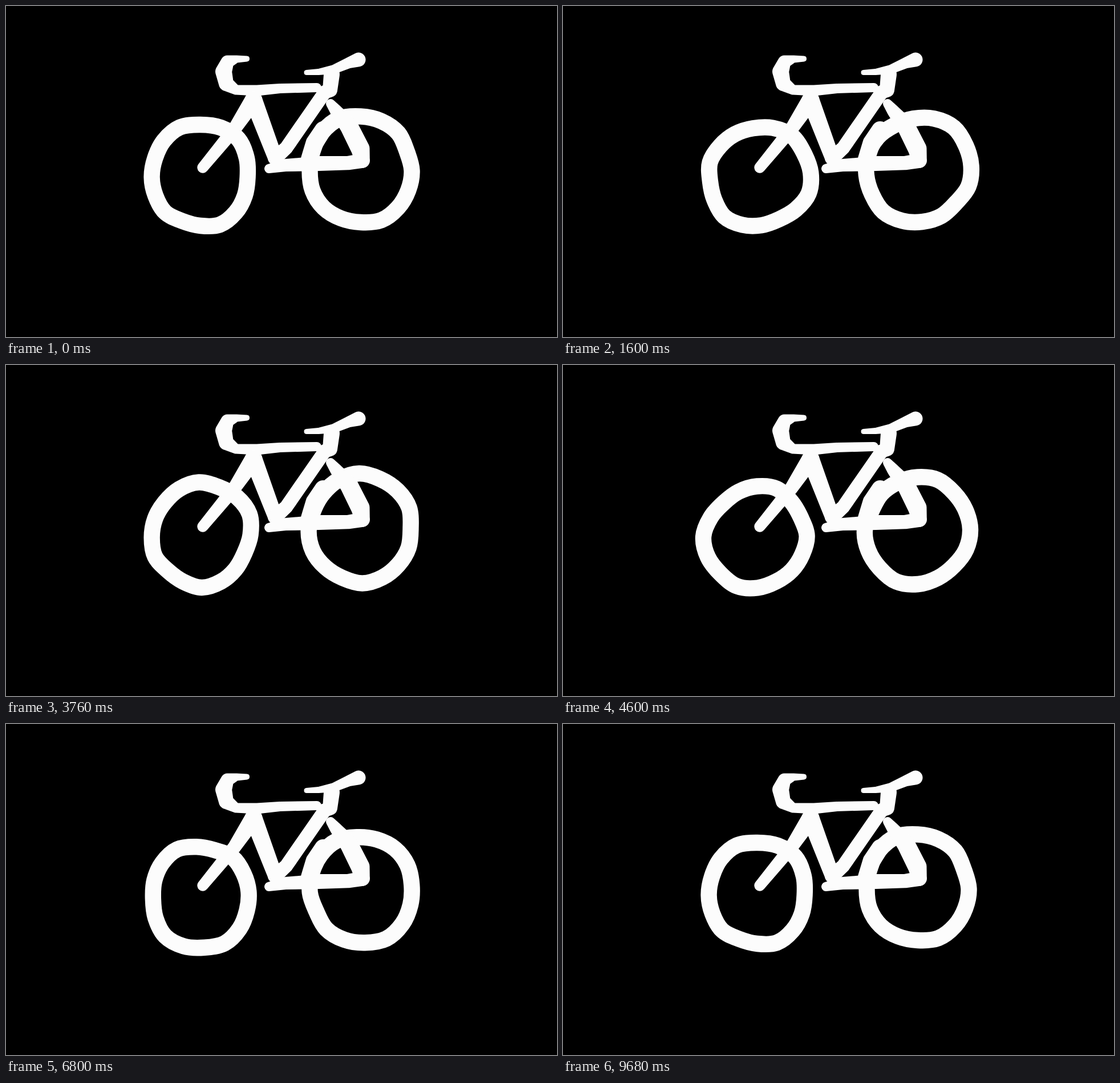
Write an HTML page that moves like this. It is 966 by 580 pixels and loops after 9720 ms.

```html
<!DOCTYPE html>
<html lang="en">
<head>
<meta charset="utf-8">
<title>Bicycle</title>
<style>
  html, body { margin: 0; width: 100%; height: 100%; overflow: hidden; background: #000; }
  svg { display: block; width: 100%; height: 100%; }
  path { fill: #fcfcfc; }
  .wheel { fill: none; stroke: #fcfcfc; stroke-width: 28.4; stroke-linejoin: round; }
</style>
</head>
<body>
<svg viewBox="0 0 966 580"></svg>
<script>
const STEP = 40, LAST = 242, TURNS = 5;
const svg = document.querySelector('svg');

function addPath(d, cls = '') {
  const el = document.createElementNS(svg.namespaceURI, 'path');
  el.setAttribute('d', d);
  el.setAttribute('class', cls);
  return svg.appendChild(el);
}

const polar = (x, y, r, a) => [x + r * Math.cos(a), y + r * Math.sin(a)];

// Wobbly rim: radii at even angles, joined by a smooth closed curve.
function rim(x, y, radii) {
  const n = radii.length;
  const at = i => polar(x, y, radii[(i + n) % n], i * 2 * Math.PI / n);
  const lean = (i, k) => at(i).map((v, j) => v + k * (at(i + 1)[j] - at(i - 1)[j]) / 6);
  return `M${at(0)}` + radii.map((_, i) =>
    `C${lean(i, 1)} ${lean(i + 1, -1)} ${at(i + 1)}`).join('') + 'Z';
}

// Tapered capsule around two circles.
function capsule([x1, y1, r1], [x2, y2, r2]) {
  const a = Math.atan2(y2 - y1, x2 - x1);
  const b = Math.acos((r1 - r2) / Math.hypot(x2 - x1, y2 - y1));
  const arc = (r, big, end) => `A${r} ${r} 0 ${+big} 1 ${end}`;
  return `M${polar(x1, y1, r1, a + b)}`
    + arc(r1, b < Math.PI / 2, polar(x1, y1, r1, a - b))
    + `L${polar(x2, y2, r2, a - b)}`
    + arc(r2, b > Math.PI / 2, polar(x2, y2, r2, a + b)) + 'Z';
}

const limb = (...joints) =>
  addPath(joints.slice(1).map((j, i) => capsule(joints[i], j)).join(''));

const wheels = [
  [340.6, 300, [83, 84.5, 87.5, 90, 85, 83, 87, 85, 85, 86, 90.5, 94.5, 92, 94, 94.5, 88]],
  [622, 288.5, [89.5, 90, 92, 94, 90.5, 90.5, 92, 91.5, 89.5, 91.5, 95.5, 98.5, 95, 94, 93, 87.5]]
].map(([x, y, radii]) => ({ x, y, el: addPath(rim(x, y, radii), 'wheel') }));

// Joints are x, y, radius.
const head = [434, 165, 15.5], crank = [472, 266, 13], seat = [559, 151, 12];

limb([422, 92.5, 5], [404, 93, 6.5], [388, 98, 11.5], [381.5, 115, 14.5],
  [386, 136, 13], [403, 147, 8.5], [440, 148, 9.5], [480, 144.5, 8.5], [545, 143, 8]); // bar, top tube
limb(head, [401, 215, 11.8], [345, 283, 9.7]);                                 // fork
limb(head, crank);                                                            // down tube
limb(seat, [491, 249, 12], crank);                                             // seat tube
limb([461, 285, 8], [490, 279, 11], [548, 276, 13], [600, 275, 12.3], [625, 271, 12.8]); // chainstay
limb([569, 171, 8], [579, 184, 11], [602, 212, 16], [621, 250, 16.5], [625, 271, 12.8]); // seat stay
limb([556, 217, 15], [541, 240, 15.5], [532, 268, 15]);                        // mudguard
limb(seat, [568, 147, 13], [571, 120, 14]);                                    // seat post
limb([527, 116.5, 4.5], [548, 115.5, 5.5], [575, 111, 8], [600, 100, 9.5], [618, 94, 12.5]); // saddle

function draw(ms) {
  const tick = Math.floor(ms / STEP) % (LAST + 1);
  const angle = -360 * TURNS * tick / LAST;
  for (const { x, y, el } of wheels) el.setAttribute('transform', `rotate(${angle} ${x} ${y})`);
}

const start = performance.now();
function loop() {
  draw(performance.now() - start);
  requestAnimationFrame(loop);
}
draw(0);
requestAnimationFrame(loop);
</script>
</body>
</html>
```
